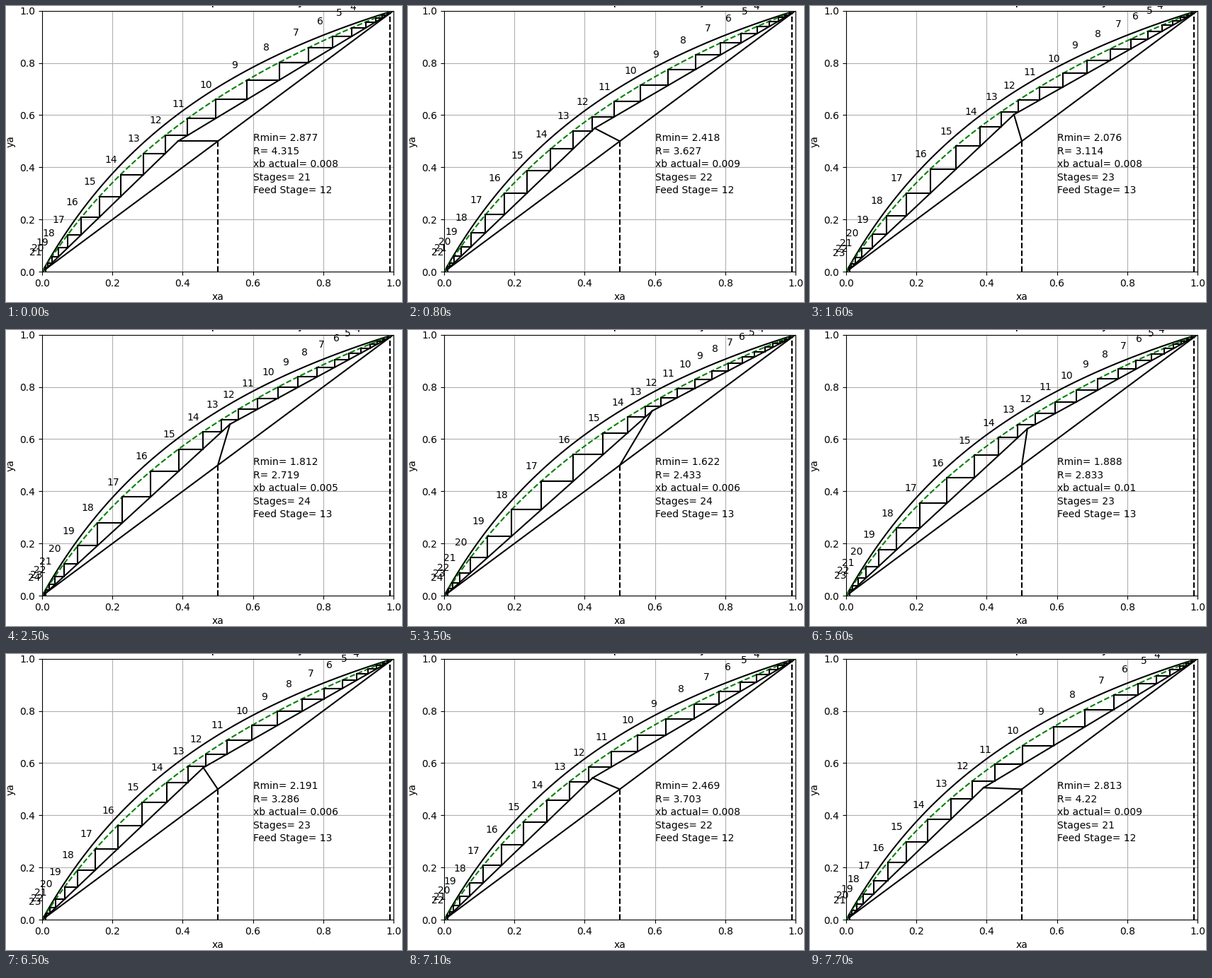
A matplotlib script that plays this animation: 559 by 419 pixels, repeating every 7800 ms.

```python
import numpy as np
import matplotlib.pyplot as plt
from matplotlib.animation import FuncAnimation

W, H, DPI = 559, 419, 100
FRAMES, INTERVAL = 78, 100

ALPHA = 179.2 / 74.3          # relative volatility
EFF = 0.8                     # stage efficiency
XD, XB, XF = 0.99, 0.01, 0.5  # distillate, bottoms, feed
R_FACTOR = 1.5
MAX_STAGES = 30


def equilibrium(x, eff=1.0):
    y = ALPHA * x / (1 + (ALPHA - 1) * x)
    return x + eff * (y - x)


def low_root(a, b, c):
    return (-b - np.sqrt(b * b - 4 * a * c)) / (2 * a)


def inverse(y):
    """Liquid fraction on the effective curve for vapour fraction y."""
    k = ALPHA - 1
    return low_root(k * (EFF - 1), k * y - 1 + EFF - EFF * ALPHA, y)


def pinch(q):
    """Crossing of the feed line and the effective curve."""
    k = ALPHA - 1
    x = low_root((q - 1) * (1 - EFF) * k - q * k,
                 (q - 1) * (1 - EFF + EFF * ALPHA) - q + XF * k,
                 XF)
    return x, equilibrium(x, EFF)


def solve(q):
    px, py = pinch(q)
    slope = (XD - py) / (XD - px)
    r_min = slope / (1 - slope)
    r = R_FACTOR * r_min

    # feed point: y (q - 1) = q x - XF meets the upper operating line
    m = r / (r + 1)
    c = XD / (r + 1)
    fx = (XF + c * (q - 1)) / (q - m * (q - 1))
    fy = m * fx + c
    low = (fy - XB) / (fx - XB)

    x, y = XD, XD
    path, corners, feed = [(x, y)], [], None
    while x > XB and len(corners) < MAX_STAGES:
        x = inverse(y)
        corners.append((x, y))
        path.append((x, y))
        if x > fx:
            y = m * x + c
        else:
            feed = feed or len(corners)
            y = XB + low * (x - XB)
        path.append((x, y))
    return r_min, r, (fx, fy), path, corners, feed


fig = plt.figure(figsize=(W / DPI, H / DPI), dpi=DPI)
ax = fig.add_axes([51 / W, 42.8 / H, 496 / W, 369.6 / H])
ax.axis([0, 1, 0, 1])
ax.grid(True)
ax.set_xlabel("xa")
ax.set_ylabel("ya")
ax.set_title("Distillation: Operation history")

xs = np.linspace(0, 1, 100)
ax.plot(xs, xs, "k")
ax.plot(xs, equilibrium(xs), "k")
ax.plot(xs, equilibrium(xs, EFF), "g--")
for x in (XD, XB, XF):
    ax.plot([x, x], [0, x], "k--")

upper, = ax.plot([], [], "k")
lower, = ax.plot([], [], "k")
feed_line, = ax.plot([], [], "k")
stairs, = ax.plot([], [], "k", solid_joinstyle="miter")
labels = [ax.text(0, 0, str(n + 1)) for n in range(MAX_STAGES)]
notes = [ax.text(0.6, 0.5 - 0.05 * n, "") for n in range(5)]


def update(i):
    half = FRAMES // 2
    q = 2 * (1 - abs(i - half) / half)
    r_min, r, (fx, fy), path, corners, feed = solve(q)

    upper.set_data([XD, fx], [XD, fy])
    lower.set_data([XB, fx], [XB, fy])
    feed_line.set_data([XF, fx], [XF, fy])
    stairs.set_data(*zip(*path))

    for n, label in enumerate(labels):
        label.set_visible(n < len(corners))
        if n < len(corners):
            x, y = corners[n]
            label.set_position((x - 0.045, y + 0.045))

    lines = (f"Rmin= {round(float(r_min), 3)}",
             f"R= {round(float(r), 3)}",
             f"xb actual= {round(float(corners[-1][0]), 3)}",
             f"Stages= {len(corners)}",
             f"Feed Stage= {feed}")
    for note, text in zip(notes, lines):
        note.set_text(text)
    return [upper, lower, feed_line, stairs, *labels, *notes]


anim = FuncAnimation(fig, update, frames=FRAMES, interval=INTERVAL,
                     repeat=True, repeat_delay=0, blit=False)
plt.show()
```
